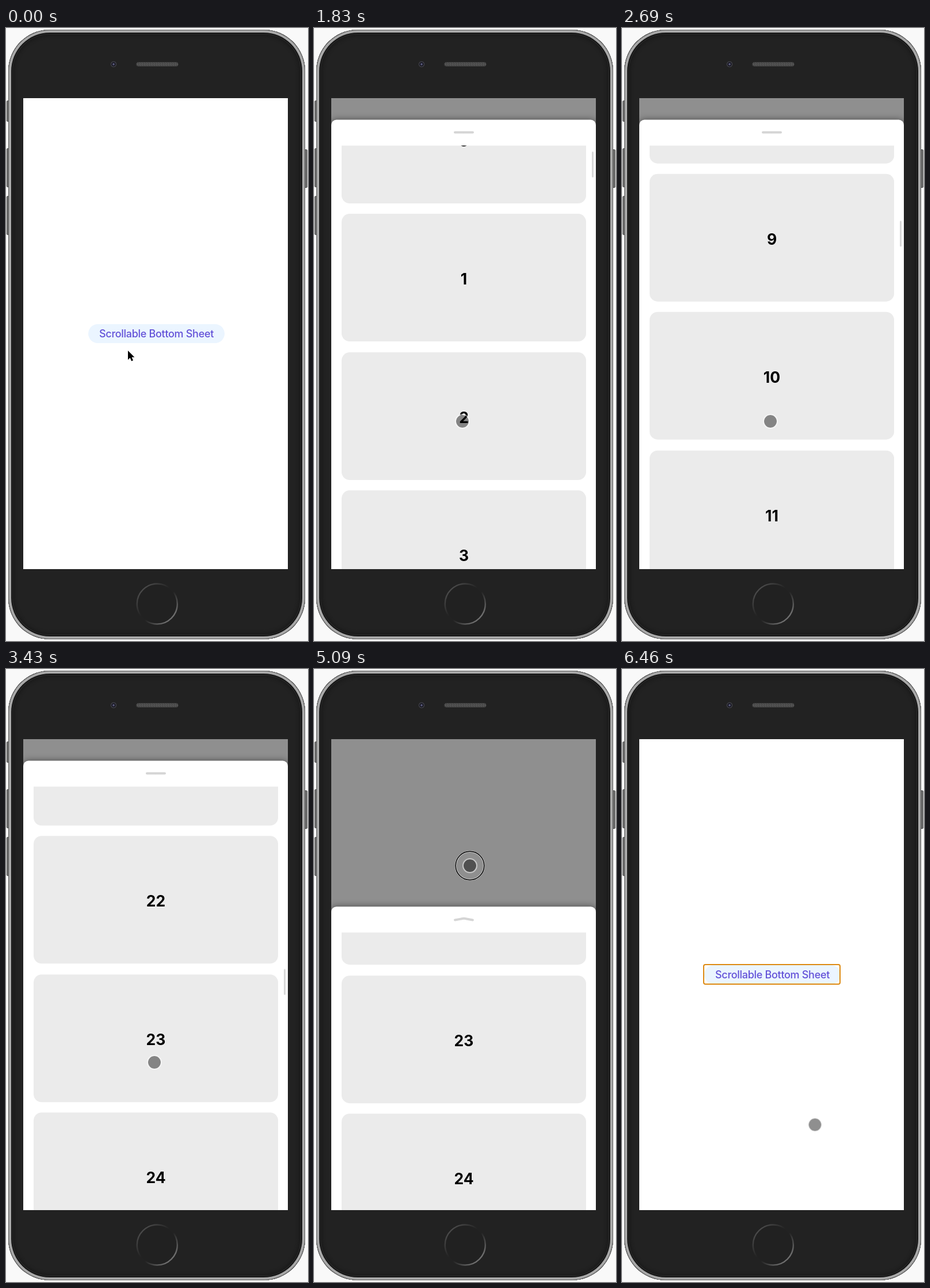
These frames come from a looping animation (525 by 1066 pixels, 6490 ms). An HTML page:

```html
<!DOCTYPE html>
<html lang="en">
<head>
<meta charset="utf-8">
<title>Scrollable Bottom Sheet</title>
<style>
@property --y { syntax: "<number>"; inherits: true; initial-value: 820; }
@property --scroll { syntax: "<number>"; inherits: true; initial-value: 0; }
@property --bend { syntax: "<number>"; inherits: true; initial-value: 0; }

html, body { margin: 0; width: 100%; height: 100%; overflow: hidden; background: #f9f9f9; }
body { position: relative; font-family: Inter, Roboto, sans-serif; }
body * { position: absolute; box-sizing: border-box; }
.loop, .loop * { animation: 6490ms linear infinite; }

/* Phone */
.key { width: 6px; background: #6e6e6e; border: 1px solid #555; border-radius: 2px; }
.phone {
  left: 4px; top: 3px; width: 516px; height: 1060px; border-radius: 72px; background: #222;
  box-shadow: inset 0 0 0 1px #5a5a5a, inset 0 0 0 5px #a9a9a9, inset 0 0 0 7px #161616,
    inset 0 0 0 8px #2c2c2c, inset 0 0 5px 11px #1b1b1b;
}
.camera {
  left: 181px; top: 56.5px; width: 12px; height: 12px; border-radius: 50%;
  background: radial-gradient(circle, #5c5c80 0 1.2px, #1a1a24 2.2px 3.4px, #46464e 4.4px, #222 5.6px);
}
.speaker {
  left: 226px; top: 59px; width: 74px; height: 8px; border-radius: 4px; border: 1px solid #3a3a3a;
  background: repeating-conic-gradient(#5e5e5e 0 25%, #3a3a3a 0 50%) 0 0 / 3px 3px;
}
.home { left: 225px; top: 963px; }

/* Screen */
.screen {
  left: 30px; top: 122px; width: 460px; height: 819px; overflow: hidden; background: #fff;
  animation-name: sheet, scroll, bend;
}
.button {
  left: 113px; top: 393px; width: 237px; height: 33px; border-radius: 17px; background: #ebf5ff;
  color: #6251d8; font-size: 18px; font-weight: 500; line-height: 33px; letter-spacing: -.3px;
  text-align: center; white-space: nowrap;
}
.focus {
  left: 111px; top: 391px; width: 239px; height: 36px; border: 2px solid #dd8a12; border-radius: 4px;
  animation-name: focus;
}
.backdrop { inset: 0; background: #000; opacity: calc(.44 * clamp(0, (820 - var(--y)) / 490, 1)); }
.sheet {
  left: 0; top: 0; width: 460px; height: 819px; border-radius: 9px 9px 0 0; background: #fff;
  box-shadow: 0 0 calc(12px * clamp(0, (820 - var(--y)) / 100, 1)) rgba(0, 0, 0, .5);
  transform: translateY(calc(var(--y) * 1px));
}
.grip { top: 20px; width: 19px; height: 4px; border-radius: 2px; background: #d5d5d5; }
.grip.l { left: 213px; transform: rotate(calc(var(--bend) * -10deg)); }
.grip.r { left: 229px; transform: rotate(calc(var(--bend) * 10deg)); }
.view { left: 0; top: 45px; width: 460px; height: 774px; overflow: hidden; }
.list { left: 18px; top: 0; width: 425px; transform: translateY(calc(var(--scroll) * -1px)); }
.card {
  left: 0; width: 425px; height: 222px; border-radius: 14px; background: #ebebeb;
  color: #000; font-size: 26.5px; font-weight: 700; line-height: 226px; text-align: center;
}
.thumb {
  left: 453px; top: 3px; width: 3px; height: 45px; border-radius: 2px; background: #d8d8d8;
  transform: translateY(calc(var(--scroll) * .0604px)); animation-name: thumb;
}

/* Pointer */
.pointer { left: 0; top: 0; animation-name: move; }
.arrow { left: -2px; top: -2px; animation-name: arrow; }
.touch { left: -13px; top: -13px; animation-name: touch; }
.dot {
  left: 0; top: 0; width: 26px; height: 26px; border-radius: 50%; border: 2px solid rgba(255, 255, 255, .5);
  background: rgba(0, 0, 0, .44) padding-box;
}
.ring { left: -14px; top: -14px; animation-name: ring; }

@keyframes sheet {
  0%, 7.2% { --y: 820; animation-timing-function: cubic-bezier(.2, .75, .3, 1); }
  14.4% { --y: 162; }
  23.1% { --y: 162; animation-timing-function: cubic-bezier(.5, 0, .8, .7); }
  27.1%, 75.97% { --y: 37.5; animation-timing-function: cubic-bezier(.4, 0, .7, .5); }
  78.43% { --y: 288.5; animation-timing-function: cubic-bezier(.25, .5, .5, 1); }
  84%, 100% { --y: 820; }
}
@keyframes scroll {
  0%, 27.1% { --scroll: 0; }
  28.2% { --scroll: 120; animation-timing-function: cubic-bezier(.33, .24, .67, .54); }
  41.45% { --scroll: 2111; animation-timing-function: cubic-bezier(.33, .25, .67, .9); }
  52.85% { --scroll: 5200; animation-timing-function: cubic-bezier(.33, .8, .67, 1); }
  60.55%, 85% { --scroll: 5453; }
  85.1%, 100% { --scroll: 0; }
}
@keyframes bend {
  0%, 7.2% { --bend: 0; }
  8.2%, 10.5% { --bend: -1; }
  13.5%, 23.5% { --bend: 0; }
  25.5% { --bend: -.6; }
  28%, 75.97% { --bend: 0; }
  77.5%, 81% { --bend: 1; }
  84%, 100% { --bend: 0; }
}
@keyframes thumb {
  0%, 12% { opacity: 0; }
  14%, 18% { opacity: .8; }
  23%, 62% { opacity: 1; }
  66%, 100% { opacity: 0; }
}
@keyframes focus {
  0% { visibility: hidden; animation-timing-function: step-end; }
  84%, 100% { visibility: visible; }
}
@keyframes move {
  0% { transform: translate(212px, 561px); animation-timing-function: ease-in-out; }
  6%, 15.6% { transform: translate(229px, 529px); animation-timing-function: ease-in-out; }
  21.5%, 64% { transform: translate(258px, 684px); animation-timing-function: ease-in-out; }
  74%, 84.5% { transform: translate(271px, 342px); animation-timing-function: ease-in-out; }
  97.5%, 100% { transform: translate(335.5px, 792.5px); }
}
@keyframes arrow {
  0% { opacity: 1; animation-timing-function: step-end; }
  6.2%, 100% { opacity: 0; }
}
@keyframes touch {
  0% { opacity: 0; animation-timing-function: step-end; }
  6.2%, 100% { opacity: 1; }
}
@keyframes ring {
  0% { opacity: 0; animation-timing-function: step-end; }
  6.4% { opacity: 1; animation-timing-function: step-end; }
  9.5% { opacity: 0; animation-timing-function: step-end; }
  75.6% { opacity: 1; animation-timing-function: step-end; }
  79.8%, 100% { opacity: 0; }
}
</style>
</head>
<body>
<div class="key" style="left:1px;top:126px;height:37px"></div>
<div class="key" style="left:1px;top:209px;height:68px"></div>
<div class="key" style="left:1px;top:292px;height:68px"></div>
<div class="key" style="left:518px;top:211px;height:67px"></div>
<div class="phone"></div>
<div class="camera"></div>
<div class="speaker"></div>
<svg class="home" width="76" height="76">
  <defs>
    <linearGradient id="rim" x1="0" y1="0" x2="1" y2="1">
      <stop offset=".1" stop-color="#505050"/>
      <stop offset=".45" stop-color="#222"/>
      <stop offset=".55" stop-color="#222"/>
      <stop offset=".85" stop-color="#707070"/>
    </linearGradient>
  </defs>
  <circle cx="37.8" cy="38.5" r="35" fill="#212121" stroke="url(#rim)" stroke-width="2.4"/>
</svg>

<div class="loop">
  <div class="screen">
    <div class="button">Scrollable Bottom Sheet</div>
    <div class="focus"></div>
    <div class="backdrop"></div>
    <div class="sheet">
      <div class="grip l"></div>
      <div class="grip r"></div>
      <div class="view">
        <div class="list"></div>
        <div class="thumb"></div>
      </div>
    </div>
  </div>
  <div class="pointer">
    <svg class="arrow" width="16" height="24">
      <path d="M2 2V18L5.7 14.6 8.1 20.3 11 19.1 8.6 13.4H13.4Z" stroke="#fff" stroke-width="1.6" paint-order="stroke"/>
    </svg>
    <div class="touch">
      <div class="dot"></div>
      <svg class="ring" width="54" height="54" fill="none">
        <circle cx="27" cy="27" r="24.6" stroke="#fff" stroke-opacity=".55" stroke-width="3"/>
        <circle cx="27" cy="27" r="24.8" stroke="#000" stroke-width="1.5"/>
      </svg>
    </div>
  </div>
</div>

<script>
const list = document.querySelector('.list');
const pitch = 240.33;
for (let i = 0; i < 50; i++) {
  const card = document.createElement('div');
  card.className = 'card';
  card.textContent = i;
  card.style.top = i * pitch + 'px';
  list.append(card);
}
</script>
</body>
</html>
```
